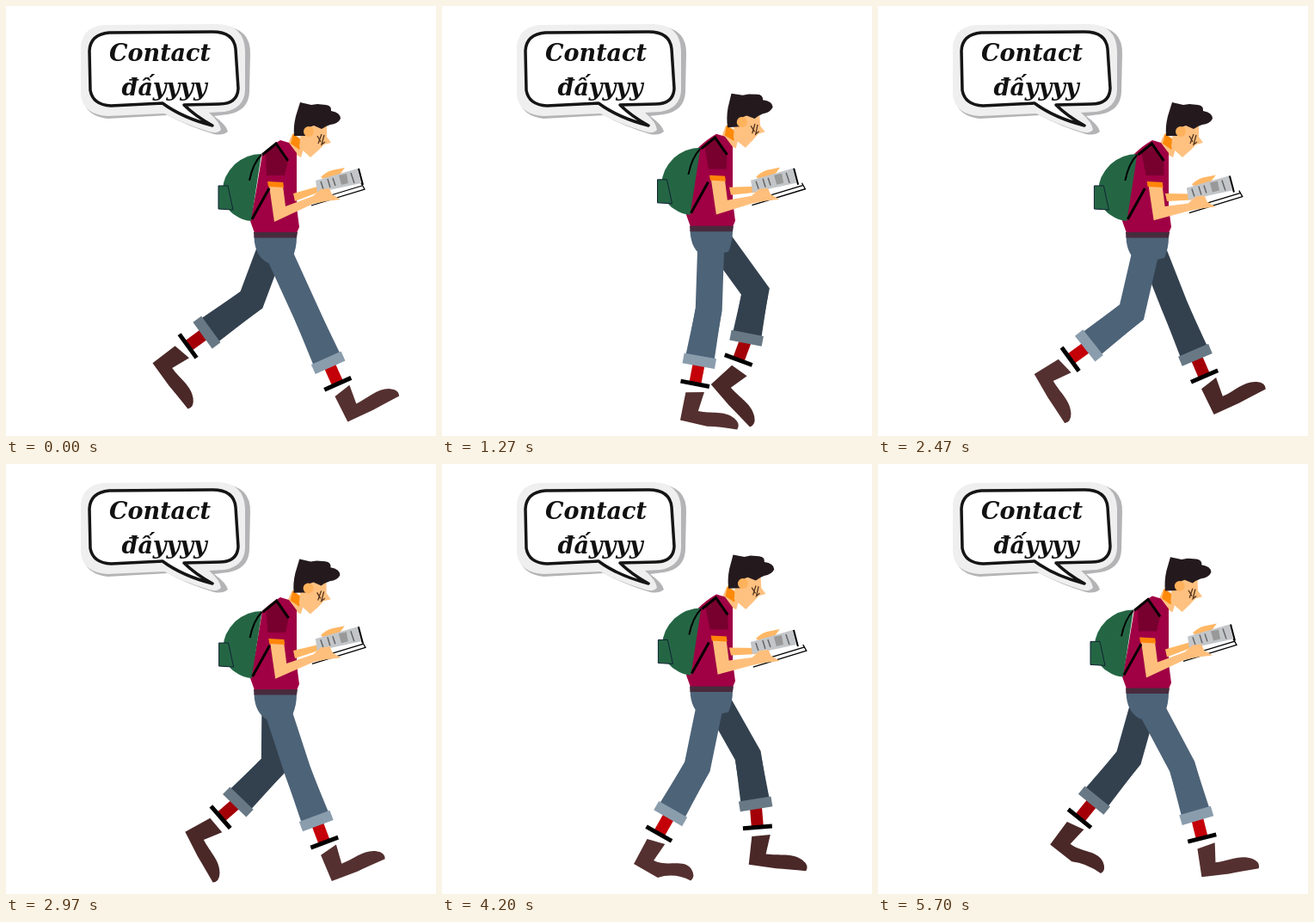
Recreate the animation shown at these times as an HTML page. Size 500 px wide and 500 px high, loop 5.73 s.

```html
<!DOCTYPE html>
<html lang="vi">
<head>
<meta charset="utf-8">
<title>Walking reader</title>
<style>
html, body { margin: 0; width: 100%; height: 100%; overflow: hidden; background: #fff; }
svg { display: block; width: 100vw; height: 100vh; }
text { font: italic bold 27px "DejaVu Serif", "Noto Serif", serif; fill: #111; }
</style>
</head>
<body>
<svg viewBox="0 0 500 500">
  <path d="M120 24 L252 23 Q285 26 284 56 L283 100 Q282 122 258 126 L242 128 Q256 138 258 146 Q252 151 242 149 Q212 140 188 127 L118 131 Q94 128 90 110Z" fill="#b4b4b6"/>
  <path d="M114 22 L246 21 Q277 22 278 52 L278 98 Q277 119 254 123 L236 124 Q249 135 250 144 Q246 149 236 146 Q206 137 184 125 L118 128 Q90 126 87 104 L87 46 Q90 24 114 22Z" fill="#efeff0"/>
  <path d="M120 31 L240 30 Q265 30 267 50 L270 96 Q269 114 248 114 L207 115 Q220 128 240 139 Q205 130 182 113 L122 116 Q101 115 98 98 L97 52 Q98 33 120 31Z" fill="#fff" stroke="#151515" stroke-width="3.500" stroke-linejoin="round"/>
  <text x="120" y="64">Contact</text>
  <text x="134.500" y="104">đấyyyy</text>

  <g id="far" transform="translate(0 -10)"></g>
  <g id="near"></g>

  <g id="head">
    <path d="M333 149 L349 157 L343 176 L325 166Z" fill="#ffc180"/>
    <path d="M334 148 L345 158 L341 167 L331 160Z" fill="#ff8a0a"/>
    <path d="M343 146 L355 136 L373 137 L373 152 L378 159 L370 161 L363 168 L354 176 L341 164Z" fill="#ffc180"/>
    <path d="M342 112 L355 115 L362 114 L372 115 Q379 116 378 122 Q389 124 389 131 Q386 137 377 138 Q371 140 367 143 L358 139 Q350 140 349 151 L335 151 Q334 140 337 128Z" fill="#241a1e"/>
    <circle cx="352" cy="146" r="6" fill="#ffb25c"/>
    <path d="M362 151 L366 158 M367 149 L363 160 M370 150 L367 161 L371 158" fill="none" stroke="#54341f" stroke-width="1.300"/>
  </g>

  <g id="torso">
    <path d="M319 156 L329 159 L338 171 L338 234 L341 257 L338 264 L289 264 L284 250 Q287 236 291 214 L298 172 Q307 163 319 156Z" fill="#a00044"/>
    <path d="M288 263 H339 L338 269.500 H288.500Z" fill="#472b3d"/>
  </g>

  <g id="pack" fill="#246644">
    <path d="M297 172 Q280 172 266 184 Q252 198 252 214 Q254 236 266 243 Q276 250 285 250Z"/>
    <path d="M247 209 L258 209 L264 237 L247 236Z" stroke="#123"/>
    <path d="M297 173 Q287 183 283 203" fill="none" stroke="#000" stroke-width="2"/>
  </g>
  <g id="arms"></g>
  <g id="straps" fill="none" stroke="#000" stroke-width="3">
    <path d="M306 212 L286 248 M298 173 L314 160 L328 180"/>
  </g>
</svg>
<script>
const $ = id => document.getElementById(id);
const move = (id, x, y, turn = '') => $(id).setAttribute('transform', `translate(${x} ${y}) ${turn}`);
const LOOP = 5730, CYCLE = 24, RAD = Math.PI / 180;

// Key poses of one stride: step, then thigh, shin and foot in degrees
const STRIDE = [
  [0, -24.5, -24, -25],
  [5, -7, -6, -2],
  [12, 20.5, 54, 54],
  [14, 0.5, 44, 63],
  [18, -35, 20, 64],
  [21, -29.5, -9, 8]
];

function key(i) {
  const m = STRIDE.length, lap = Math.floor(i / m);
  const [step, ...angles] = STRIDE[i - lap * m];
  return [step + lap * CYCLE, ...angles];
}

// Smooth cubic through the key poses
function pose(step) {
  let i = 0;
  while (key(i + 1)[0] <= step) i++;
  const [a, b, c, d] = [-1, 0, 1, 2].map(k => key(i + k));
  const span = c[0] - b[0], x = (step - b[0]) / span;
  return b.map((v, k) => {
    const m0 = (c[k] - a[k]) / (c[0] - a[0]) * span;
    const m1 = (d[k] - v) / (d[0] - b[0]) * span;
    const e = c[k] - v;
    return v + x * (m0 + x * (3 * e - 2 * m0 - m1 + x * (m0 + m1 - 2 * e)));
  }).slice(1);
}

// The end of a bone that hangs from a point
const hang = ([x, y], angle, length) =>
  [x - length * Math.sin(angle * RAD), y + length * Math.cos(angle * RAD)];

function leg(step, hipY, [cloth, cuff, sock, shoe]) {
  const [thigh, shin, foot] = pose(step);
  const ankle = shin + (foot - shin) / 4;
  const reach = 143 + 7 * Math.max(0, Math.cos(step * Math.PI / 12)) ** 6;
  const thighLength = 82 - .16 * thigh, shinLength = reach - thighLength;
  const hip = [313, hipY];
  const knee = hang(hip, thigh, thighLength);
  const hem = hang(knee, shin, shinLength);
  const joint = hang(hem, ankle, 45);
  const lift = Math.max(0, 14 - 6 * Math.abs(step - 9)); // toes bend before push-off
  return `
    <g transform="translate(${joint}) rotate(${foot}) translate(0 -18)">
      <path d="M-11 4 L13 0 L12 9 L-9 13Z" fill="#fff"/>
      <path d="M-9 12 L12 7 L10 30 C26 30 40 ${24 - lift} 53 ${31 - lift} Q62 ${36 - lift} 59 ${43 - lift} Q38 ${44 - lift} 24 45 L-8 45Z" fill="${shoe}"/>
    </g>
    <g transform="translate(${hem}) rotate(${ankle})">
      <path d="M0 0 V26" stroke="${sock}" stroke-width="14"/>
      <path d="M-17 27 H17" stroke="#000" stroke-width="5"/>
    </g>
    <path d="M${hip} L${knee} L${hem}" fill="none" stroke="${cloth}" stroke-width="31"/>
    <g transform="translate(${hem}) rotate(${shin})">
      <path d="M-15 ${-shinLength} H15 L17 0 H-17Z" fill="${cloth}"/>
      <path d="M-19 0 H19" stroke="${cuff}" stroke-width="12"/>
    </g>`;
}

const hips = dy => `<path transform="translate(0 ${dy})" fill="#4d6378" d="M288.500 268 H338 Q338 282 333 293 L305 299 Q289 291 288.500 268Z"/>`;

// sway: how far the arms have swung forward
function arms(sway) {
  const top = 2.4 * sway, s = 4.7 * sway, h = 2 * sway, v = 4.7 * sway;
  return `
    <path d="M334 218 L${362 + h} ${210 + v} L${362 + h} ${217 + v} L336 227Z" fill="#ffb765"/>
    <g transform="translate(${3.7 * sway} ${v})">
      <path d="M356 222 L411 201 L417 213 L355 232Z" fill="#fff"/>
      <path d="M355 232 L417 213 L413 206 M358 226 L414 209" fill="none" stroke="#000" stroke-width="1.300"/>
    </g>
    <g transform="translate(${-.6 * sway} ${v})">
      <path d="M366 199 Q372 193 379 191 L394 188 L388 196 L372 203Z" fill="#ffb765"/>
      <path d="M360 203 L409 189 L413 206 L362 217Z" fill="#c3c6c9"/>
      <path d="M410 189 L415 208" stroke="#000" stroke-width="2"/>
      <path d="M366 204 L369 213 M374 201 L377 211 M380 200 L383 209 M401 194 L405 206" stroke="#666" stroke-width="1.500"/>
      <path d="M387 197 L396 195 L398 206 L390 208Z" fill="#999"/>
    </g>
    <path d="M${306 + s} 209 L${322 + s} 209 L${325 + s} 233 L${357 + h} ${221 + v} L${366 + h} ${213 + v} L${376 + h} ${212 + v} L${379 + h} ${219 + v} L${389 + h} ${225 + v} L${372 + h} ${227 + v} L${357 + h} ${230 + v} L${312 + s} ${251 - sway}Z" fill="#ffbf7c"/>
    <path d="M${304 + s} 203 L${322 + s} 204 L${323 + s} 211 L${305 + s} 210Z" fill="#ff850a"/>
    <path d="M${303 + s} 194 L${324 + s} 194 L${323 + s} 205 L${304 + s} 204Z" fill="#a00044"/>
    <path d="M${302 + top} 171 L${314 + top} 160 L${328 + top} 180 L${324 + s} 197 L${303 + s} 197Z" fill="#78002f"/>`;
}

const NEAR = ['#4d6378', '#8a9dad', '#c40008', '#553030'];
const FAR = ['#33414f', '#687985', '#a40008', '#4a2828'];

function draw(n) {
  const first = Math.cos(Math.PI / 12);
  const bob = Math.cos((n - .5) * Math.PI / 6) - first;
  const sway = Math.cos((n - 11) * Math.PI / 12) + first;
  const dy = 3.7 * bob;

  $('far').innerHTML = leg((n + 12) % CYCLE, 278 + dy, FAR);
  $('near').innerHTML = leg(n % CYCLE, 278 + dy, NEAR) + hips(dy);
  $('arms').innerHTML = arms(sway);
  move('torso', 0, dy);
  move('arms', 0, dy);
  move('pack', 2.4 * sway, dy);
  move('straps', 2.4 * sway, dy);
  move('head', bob, 5.3 * bob, `rotate(${2 * bob} 340 165)`);
}

// Five poses every 200 ms, the first of them held longest
function tick(now) {
  const t = now % LOOP, part = t % 200;
  draw(5 * Math.floor(t / 200) + [70, 100, 130, 170].filter(s => part >= s).length);
  requestAnimationFrame(tick);
}
tick(0);
</script>
</body>
</html>
```
